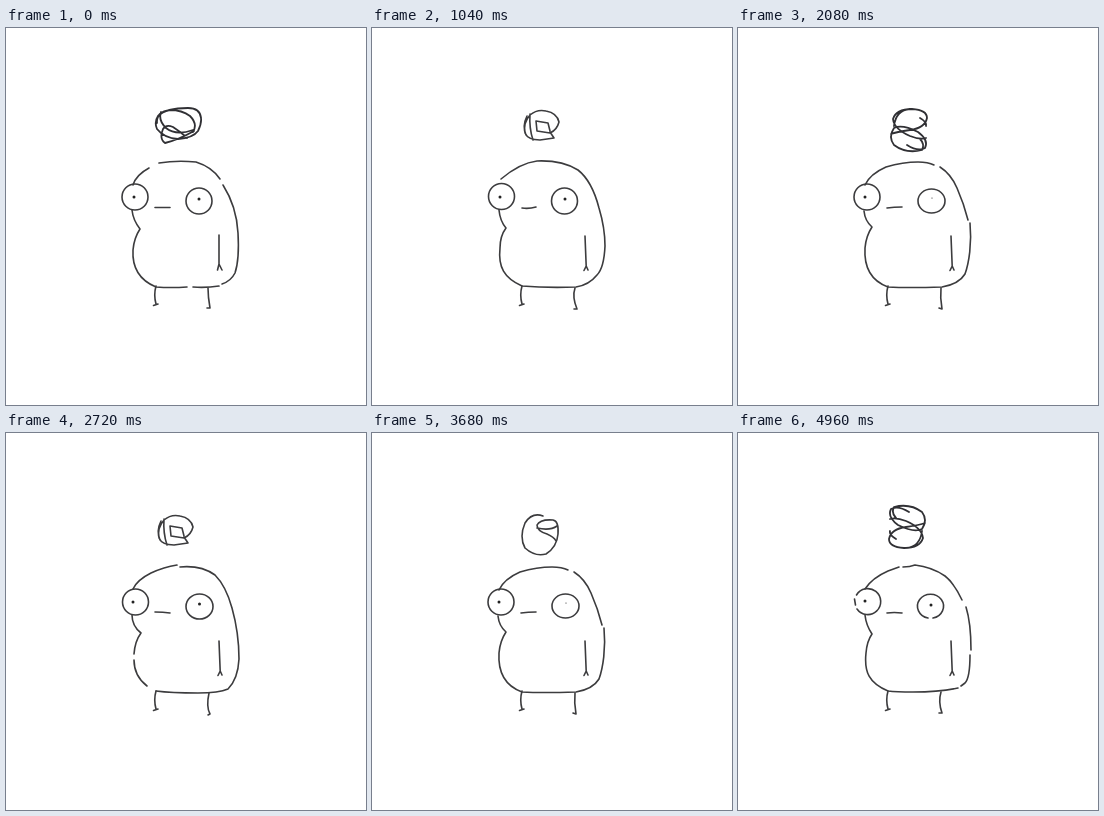
Animation of 360x377 px, one loop 5.04 s. Source, as an HTML page without scripts:

```html
<!DOCTYPE html>
<html lang="en">
<head>
<meta charset="utf-8">
<title>Tangled thoughts</title>
<style>
  html, body { margin: 0; width: 100%; height: 100%; overflow: hidden; background: #fff; }
  svg { display: block; overflow: hidden; }
  .ink { fill: none; stroke: #3c3c3e; stroke-width: 1.6; stroke-linecap: round; stroke-linejoin: round; }
  .bold { stroke: #303034; stroke-width: 1.8; }
  .dot { fill: #222; stroke: none; }
  /* Film strips: one cell is 130px wide and lasts 80ms. */
  .bodies { animation: bodies 5.04s steps(63) infinite; }
  .tangles { animation: tangles 1.68s steps(21) infinite; }
  @keyframes bodies { to { transform: translateX(-8190px); } }
  @keyframes tangles { to { transform: translateX(-2730px); } }
</style>
</head>
<body>
<svg width="360" height="377" viewBox="0 0 360 377">
  <defs>
    <circle id="eye" r="13"/>
    <circle id="pupil" class="dot" r="1.5"/>
    <path id="arm" d="M213 208L214.200 238L212 242.500M214.200 238L216 242"/>

    <!-- Five wobbling drawings of the body -->
    <g id="wobble">
      <g>
        <path d="M127 157Q130 147 143 140M153 135C165 133 180 133 190 134Q206 139 214 151M217 157C224 168 231 185 232 205C233 222 232 236 229 245Q225 253 216 256M213 258Q200 260 187 259M181 259Q165 260 150 259C133 252 126 240 127 222Q128 210 134 201Q127 192 126 182"/>
        <path d="M149 179.500H164M202 260Q202 269 204 280H201M213 207V236L211.500 242M213 236L216 242"/>
        <use href="#eye" x="129" y="169"/><use href="#pupil" x="128" y="169"/>
        <use href="#eye" x="193" y="173"/><use href="#pupil" x="193" y="171"/>
      </g>
      <g transform="translate(130)">
        <path d="M127 157Q132 146 148 139Q165 134 180 134Q190 134 196 137M202 139Q213 146 219 160Q226 176 230 192M232 195C234 215 231 235 227 246Q221 256 204 259Q170 260 150 259C131 252 126 237 127 220Q128 208 134 199Q127 193 126 183"/>
        <path d="M149 180Q156 179 164 179M203 260Q202 270 204 281L201 280"/>
        <use href="#arm"/>
        <use href="#eye" x="129" y="169"/><use href="#pupil" x="127" y="169"/>
        <ellipse cx="193.500" cy="173" rx="13.500" ry="12"/><circle class="dot" cx="194" cy="170" r=".6"/>
      </g>
      <g transform="translate(260)">
        <path d="M127 156Q134 145 150 138L161 134M165 134Q172 134 177 132Q194 134 207 143Q216 150 224 167M228 174Q233 190 233 217M232 222Q232 245 227 250L223 253M220 255Q202 259 175 259Q158 259 150 258C131 250 126 239 128 220Q129 208 134 201Q128 192 127 182"/>
        <path d="M149 180Q156 179 164 180M203 259Q200 269 204 280H201"/>
        <path d="M119 176A13 13 0 1 0 118.500 162M116.500 166L117.500 172M190 185A13 12 0 1 1 195 185"/>
        <use href="#arm"/>
        <use href="#pupil" x="127" y="168"/><use href="#pupil" x="193" y="172"/>
      </g>
      <g transform="translate(390)">
        <path d="M129 151Q148 135 165 133Q190 132 206 142Q220 153 227 180Q233 200 233 218Q232 240 225 247Q217 257 204 259Q175 260 150 258C132 250 126 239 128 220Q128 208 134 200Q128 193 127 182"/>
        <path d="M150 180Q157 181 164 179M203 260Q200 269 205 281H202"/>
        <use href="#arm"/>
        <use href="#eye" x="129.500" y="168.500"/><use href="#pupil" x="128" y="169"/>
        <use href="#eye" x="192.500" y="173"/><use href="#pupil" x="193" y="171"/>
      </g>
      <g transform="translate(520)">
        <path d="M127 156Q131 147 145 140Q158 134 171 132M174 134Q195 132 209 142Q220 153 226 175Q233 200 233 226Q232 246 222 256Q213 260 192 260Q165 260 150 258M141 253Q128 243 128 227M128 221Q129 208 135 200Q126 193 126 182"/>
        <path d="M149 179Q157 179 164 180M203 260Q200 274 204 281L202 282"/>
        <use href="#arm"/>
        <use href="#eye" x="129.500" y="169"/><use href="#pupil" x="127" y="169"/>
        <ellipse cx="193.500" cy="173.500" rx="13.500" ry="12.500"/><use href="#pupil" x="193.500" y="171"/>
      </g>
    </g>

    <!-- Tangles -->
    <path id="knot" class="bold" d="M195 90Q194 80 182 80Q160 80 152 88Q148 94 151 101Q158 110 172 111Q187 110 192 103Q197 93 194 86M151 95Q150 84 164 82Q176 82 184 88Q192 96 187 104M155 84Q152 92 160 100Q170 108 187 102M188 103Q172 112 159 115Q153 111 157 101Q160 96 167 99Q175 104 181 110"/>
    <path id="ring" class="bold" d="M161 83Q148 88 148 98Q150 115 166 118Q185 118 190 101Q189 84 172 82Q165 81 158 86M188 104Q178 104 174 92Q168 85 164 92Q161 104 163 109Q172 110 177 101Q176 94 168 95Q161 98 163 106M168 96Q168 108 173 114M173 96Q182 94 188 104"/>
    <path id="ribbon" d="M149 88Q150 80 158 79Q172 80 185 92Q186 102 176 102Q163 102 158 99Q157 90 165 87Q174 86 178 95Q160 96 149 88M158 95Q170 94 182 95Q189 105 187 114Q180 121 168 118Q157 113 154 108Q158 98 172 95"/>
    <path id="shell" d="M158 87Q165 81 174 83Q185 85 187 94Q185 102 178 105L165 103 164 93 176 95 178 103M158 87Q151 95 153 105Q156 112 168 112L182 110 178 104M158 86Q157 100 161 112M155 88Q150 98 154 107"/>
    <path id="curl" d="M171 83Q160 79 153 90Q147 104 153 115Q163 124 174 121Q185 114 186 101Q187 88 181 87Q168 86 165 92Q165 98 175 101Q182 104 184 108M165 95Q178 98 185 93"/>
    <path id="nest" class="bold" d="M160 115Q148 114 147 103Q150 89 168 88Q180 88 182 94Q172 108 162 114M152 110Q148 98 163 91M155 113Q152 104 160 98Q170 92 174 101Q178 108 190 104M158 107Q164 94 178 93M180 89L190 96Q180 105 168 109M191 104Q195 114 184 118Q171 120 168 113Q173 105 184 105"/>
    <path id="spring" class="bold" d="M171 79Q160 72 153 76Q149 84 160 92Q176 100 184 96Q190 87 184 79Q172 70 156 74Q153 80 158 85M152 86Q158 84 168 88Q184 95 185 105Q182 115 166 115Q151 114 151 106Q153 96 168 94Q182 92 187 90M158 106Q151 102 152 98M168 115Q182 114 184 98"/>
  </defs>

  <g class="ink">
    <path d="M150 258Q147.500 267 150 276M147.500 277.500L152 276"/>

    <svg x="110" width="130" height="377" viewBox="110 0 130 377">
      <g class="bodies">
        <use href="#wobble"/>
        <use href="#wobble" x="650"/>
        <use href="#wobble" x="1300"/>
        <use href="#wobble" x="1950"/>
        <use href="#wobble" x="2600"/>
        <use href="#wobble" x="3250"/>
        <use href="#wobble" x="3900"/>
        <use href="#wobble" x="4550"/>
        <use href="#wobble" x="5200"/>
        <use href="#wobble" x="5850"/>
        <use href="#wobble" x="6500"/>
        <use href="#wobble" x="7150"/>
        <use href="#wobble" x="7800"/>
      </g>
    </svg>

    <!-- Each tangle appears plain, mirrored and turned over -->
    <svg x="110" width="130" height="130" viewBox="110 0 130 130">
      <g class="tangles">
        <use href="#knot"/>
        <use href="#ribbon" transform="translate(470) scale(-1 1)"/>
        <use href="#nest" transform="translate(600 196) scale(-1)"/>
        <use href="#shell" transform="translate(730) scale(-1 1)"/>
        <use href="#curl" x="520"/>
        <use href="#spring" transform="translate(990 196) scale(-1)"/>
        <use href="#knot" transform="translate(1120) scale(-1 1)"/>
        <use href="#ribbon" transform="translate(1250 196) scale(-1)"/>
        <use href="#ring" x="1040"/>
        <use href="#curl" transform="translate(1510) scale(-1 1)"/>
        <use href="#shell" transform="translate(1640 196) scale(-1)"/>
        <use href="#spring" transform="translate(1770) scale(-1 1)"/>
        <use href="#nest" x="1560"/>
        <use href="#shell" x="1690"/>
        <use href="#ring" transform="translate(2160 196) scale(-1)"/>
        <use href="#nest" transform="translate(2290) scale(-1 1)"/>
        <use href="#knot" transform="translate(2420 196) scale(-1)"/>
        <use href="#ring" transform="translate(2550) scale(-1 1)"/>
        <use href="#curl" transform="translate(2680 196) scale(-1)"/>
        <use href="#ribbon" x="2470"/>
        <use href="#spring" x="2600"/>
      </g>
    </svg>
  </g>
</svg>
</body>
</html>
```
